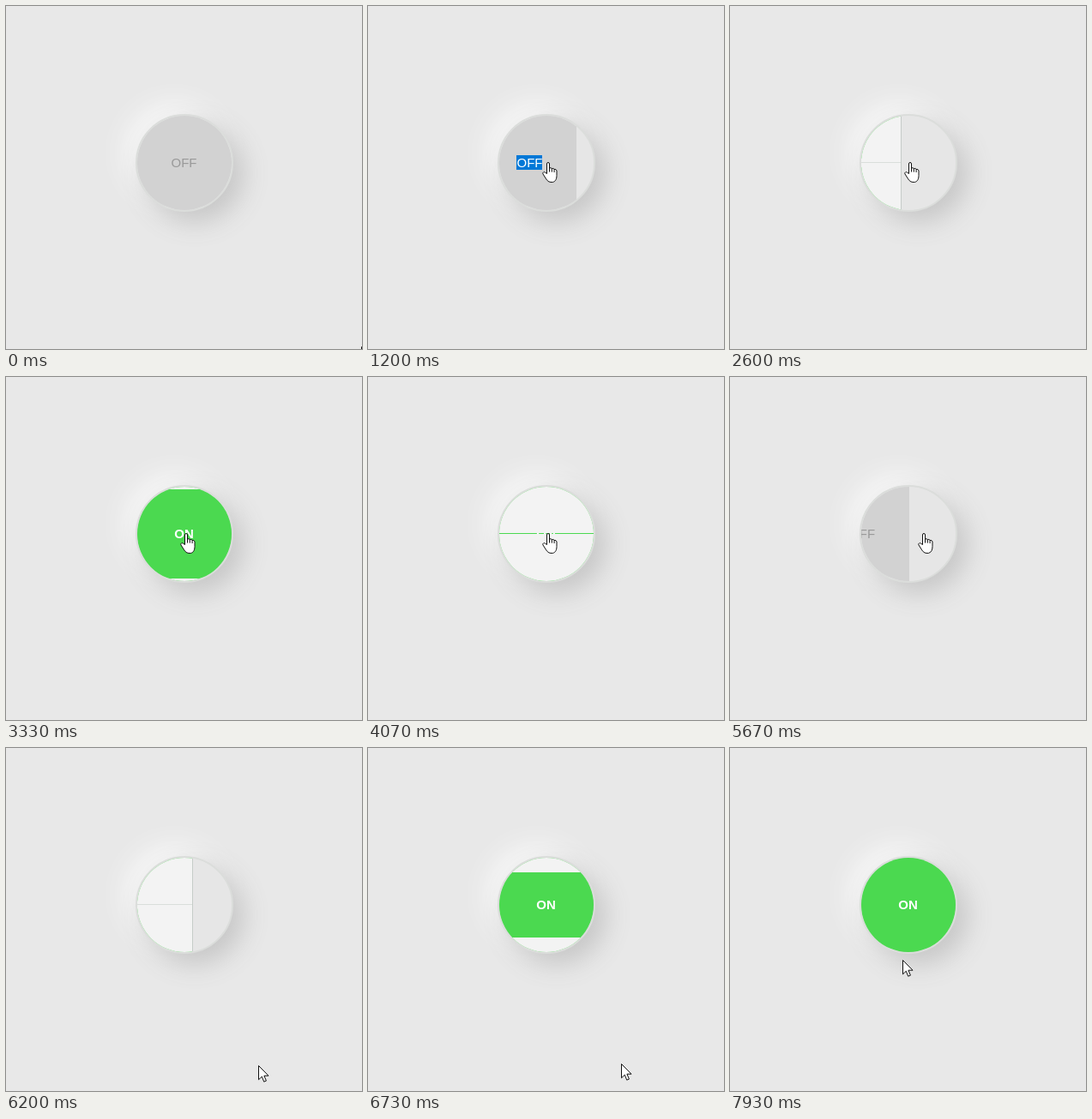
Animation of 415x400 px, one loop 8000 ms. Source, as an HTML page:

```html
<!DOCTYPE html>
<html lang="en">
<head>
<meta charset="utf-8">
<title>Toggle button</title>
<style>
html, body { margin: 0; width: 100%; height: 100%; overflow: hidden; background: #e8e8e8; }
.button {
  position: absolute; left: 150.5px; top: 126px; width: 110px; height: 110px;
  border: 2px solid #dbdddb; border-radius: 50%; overflow: hidden; background: #e6e6e6;
  box-shadow: 12px 12px 30px #c6c6c6, -12px -12px 30px #f8f8f8;
  font: 15px "Liberation Sans", Arial, sans-serif;
}
.panel {
  position: absolute; top: 0; left: 0; width: 100%; height: 100%;
  box-sizing: border-box; padding-bottom: 2px;
  display: flex; align-items: center; justify-content: center;
}
.off { background: #d2d2d2; color: #999; }
.on { background: #4bd950; color: #fff; font-weight: bold; box-shadow: 1px 0 #c6ccc8; }
.selected { background: #0078d7; color: #fff; }
.shutter { position: absolute; left: 0; width: 100%; background: #f3f3f3; }
.upper { top: 0; }
.lower { bottom: 0; }
.closed .upper { box-shadow: inset 0 -1px #d9dedb; }
.cursor { position: absolute; left: 0; top: 0; overflow: visible; }
.cursor path { fill: #fff; stroke: #111; stroke-linejoin: round; }
</style>
</head>
<body>
<div class="button">
  <div class="panel off"><span class="label">OFF</span></div>
  <div class="panel on">ON
    <div class="shutter upper"></div>
    <div class="shutter lower"></div>
  </div>
</div>
<svg class="cursor" width="20" height="26">
  <path class="arrow" d="M.5.5V16.8L4.3 13.2 6.7 19.2 9.4 18.1 6.9 12.2H12Z"/>
  <path class="hand" transform="translate(-7)" d="M5.5 13.5V2a1.5 1.5 0 0 1 3 0V7q1.7-.9 2.8.6 1.8-.7 2.8.8 2.4-.4 2.9 1.6V15.5C17 19 16 22.5 12.5 23.4H10C7 23.4 5 20.5 3.6 18L.9 13.8C.2 12 2.5 11 3.6 12.2ZM8.5 7v4.5M11.3 7.6v4M14.1 8.4v3.6"/>
</svg>
<script>
const LOOP = 8000, MOVE = 500, TRAVEL = 112;
const CLICKS = [1970, 3620, 5530];   // on, off, on
const PULL = 1125, RELEASE = 1890;   // the first click drags the panel a little
const $ = s => document.querySelector(s);
const [button, off, on, label, upper, lower, cursor, arrow, hand] =
  ['.button', '.off', '.on', '.label', '.upper', '.lower', '.cursor', '.arrow', '.hand'].map($);

const clamp = x => Math.min(1, Math.max(0, x));
const mix = (a, b, p) => a + (b - a) * p;
const smooth = p => p * p * (3 - 2 * p);

// CSS "ease": cubic-bezier(.25, .1, .25, 1)
function ease(x) {
  x = clamp(x);
  const curve = (s, a, b) => 3 * (1 - s) ** 2 * s * a + 3 * (1 - s) * s * s * b + s ** 3;
  let lo = 0, hi = 1;
  for (let i = 0; i < 20; i++) {
    const mid = (lo + hi) / 2;
    if (curve(mid, .25, .25) < x) lo = mid; else hi = mid;
  }
  return curve(lo, .1, 1);
}

// Stages 0, 1, 2 run in order when switching on and in reverse when switching off
function progress(t, stage) {
  return CLICKS.reduce((sum, click, i) => {
    const isOn = i % 2 === 0;
    const start = click + MOVE * (isOn ? stage : 2 - stage);
    return sum + (isOn ? 1 : -1) * ease((t - start) / MOVE);
  }, 0);
}

function offProgress(t) {
  if (t > CLICKS[1]) return progress(t, 0);
  const pulled = 0.17 * clamp((t - PULL) / 70);
  return mix(pulled, 1, ease((t - RELEASE) / MOVE));
}

// Pointer stops: ms, x, y
const STOPS = [
  [270, 414, 397], [670, 180, 215], [870, 210, 182], [4700, 210, 182],
  [4930, 259, 219], [5180, 226, 182], [5750, 226, 182], [6300, 300, 388],
  [6730, 295, 368], [6930, 68, 350], [7130, 140, 327], [7805, 140, 327], [7930, 201, 247]
];
function pointer(t) {
  const i = STOPS.findIndex(stop => stop[0] > t);
  if (i < 1) return STOPS.at(i).slice(1);
  const [t0, x0, y0] = STOPS[i - 1], [t1, x1, y1] = STOPS[i];
  const p = smooth((t - t0) / (t1 - t0));
  return [mix(x0, x1, p), mix(y0, y1, p)];
}

function draw(t) {
  const open = 1 - progress(t, 2);
  off.style.left = -TRAVEL * offProgress(t) + 'px';
  on.style.left = TRAVEL * (progress(t, 1) - 1) + 'px';
  upper.style.height = 54.6 * open + 'px';
  lower.style.height = 55.4 * open + 'px';
  button.classList.toggle('closed', open > 0.999);
  label.classList.toggle('selected', t > PULL - 15 && t < RELEASE + MOVE);

  const [x, y] = pointer(t).map(Math.round);
  const hover = Math.hypot(x - 207.5, y - 183) < 57;
  cursor.style.transform = `translate(${x}px, ${y}px)`;
  hand.style.display = hover ? '' : 'none';
  arrow.style.display = hover ? 'none' : '';
}

const begin = performance.now();
function tick() {
  draw((performance.now() - begin) % LOOP);
  requestAnimationFrame(tick);
}
tick();
</script>
</body>
</html>
```
